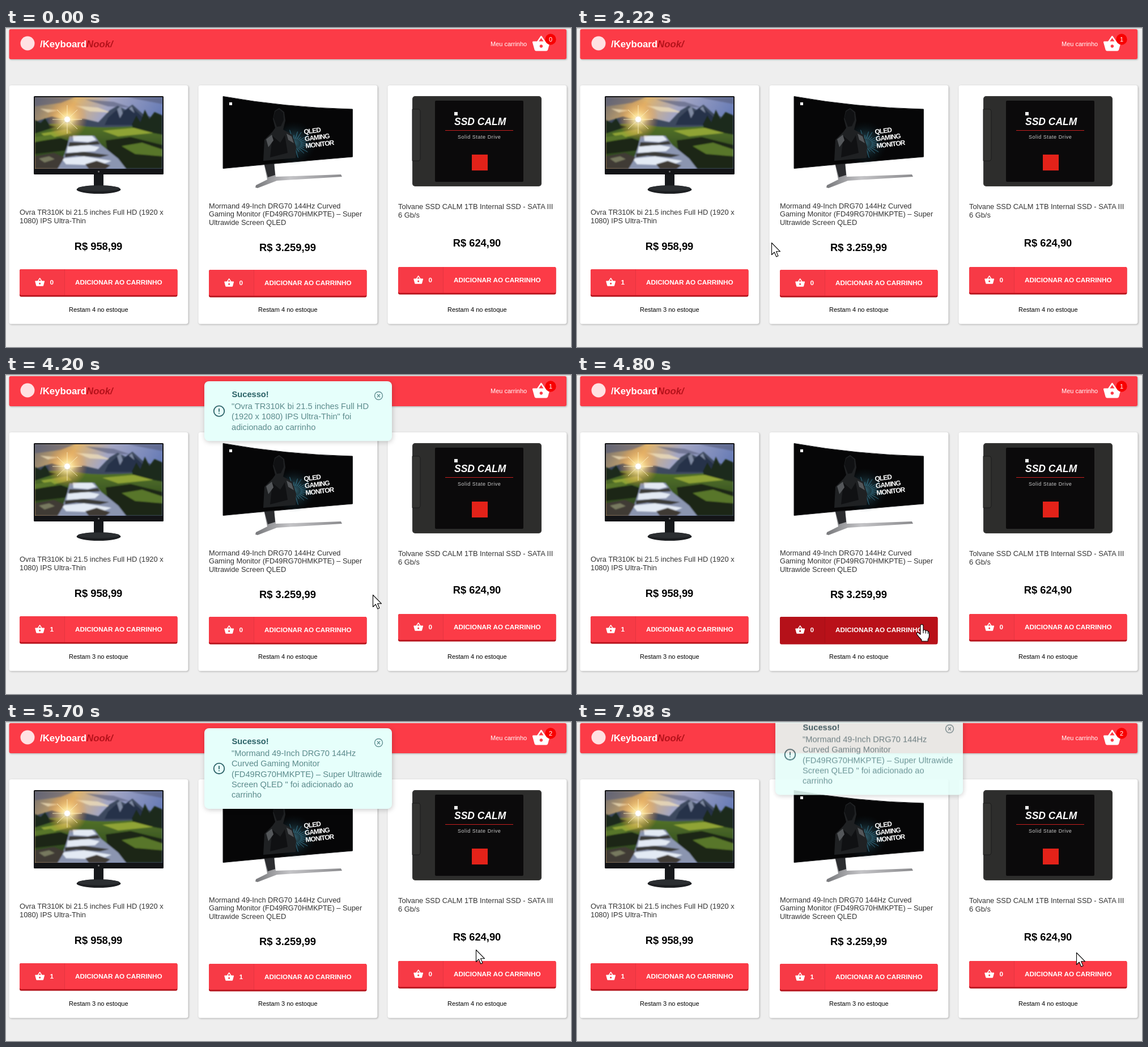
Animation, 997 px wide and 562 px high, one loop 8 s. Source, as an HTML page:

```html
<!DOCTYPE html>
<html lang="pt-BR">
<head>
<meta charset="utf-8">
<title>Loja</title>
<style>
  html, body { margin: 0; width: 100%; height: 100%; overflow: hidden; background: #eee; }
  svg { display: block; width: 997px; height: 562px; font-family: "Liberation Sans", Arial, sans-serif; }

  .brand { font-size: 16.8px; font-weight: bold; fill: #fff; }
  .brand tspan { fill: #b5121b; font-style: italic; }
  .small { font-size: 11px; }
  .name { font-size: 12.84px; fill: #333; }
  .price { font-size: 18.34px; font-weight: bold; }
  .label { font-size: 11.75px; font-weight: bold; fill: #fff; }
  .mid { text-anchor: middle; }
  .face { fill: #fc3b47; }
  .title { font-size: 14.67px; font-weight: bold; fill: #2a6166; }
  .desc { font-size: 14.67px; fill: #5c8a8c; }
  .card { fill: #fff; filter: drop-shadow(1px 1px 1.5px rgba(0,0,0,.28)); }
  .toast rect { fill: #e6fffb; filter: drop-shadow(1px 2px 4px rgba(0,0,0,.2)); }
  .icon { fill: none; stroke: #2a6166; stroke-linecap: round; }

  .show1, .show2, .hide1, .hide2, .hover1, .hover2, .toast, .cursor, .arrow, .hand {
    animation: 8s step-end infinite;
  }
  .show1 { animation-name: show1; }
  .show2 { animation-name: show2; }
  .hide1 { animation-name: hide1; }
  .hide2 { animation-name: hide2; }
  .hover1 { animation-name: hover1; }
  .hover2 { animation-name: hover2; }
  .toast1 { animation-name: toast1; }
  .toast2 { animation-name: toast2; }
  .cursor { animation-name: move; }
  .arrow { animation-name: arrow; }
  .hand { animation-name: hand; }

  @keyframes show1 { 0% { opacity: 0 } 27.75%, 100% { opacity: 1 } }
  @keyframes hide1 { 0% { opacity: 1 } 27.75%, 100% { opacity: 0 } }
  @keyframes show2 { 0% { opacity: 0 } 68.25%, 100% { opacity: 1 } }
  @keyframes hide2 { 0% { opacity: 1 } 68.25%, 100% { opacity: 0 } }
  @keyframes hover1 { 0%, 14.25%, 100% { fill: #fc3b47 } 9% { fill: #b91119 } }
  @keyframes hover2 { 0%, 62.25%, 100% { fill: #fc3b47 } 58.5% { fill: #b91119 } }
  @keyframes hand { 0%, 14.25%, 62.25%, 100% { opacity: 0 } 9%, 58.5% { opacity: 1 } }
  @keyframes arrow { 0%, 14.25%, 62.25%, 100% { opacity: 1 } 9%, 58.5% { opacity: 0 } }

  @keyframes toast1 {
    0%     { opacity: 0; transform: translateY(-120px) }
    29.25% { opacity: .6; transform: translateY(-40px) }
    30%    { opacity: .9; transform: translateY(-10px) }
    30.75% { opacity: 1; transform: none }
    56.25% { opacity: .97; transform: translateY(-8px) }
    57%    { opacity: .88; transform: translateY(-24.5px) }
    57.75% { opacity: .68; transform: translateY(-48px) }
    58.5%  { opacity: .42; transform: translateY(-74px) }
    59.25% { opacity: .18; transform: translateY(-98px) }
    60%, 100% { opacity: 0; transform: translateY(-120px) }
  }
  @keyframes toast2 {
    0%     { opacity: 0; transform: translateY(-160px) }
    69.75% { opacity: .6; transform: translateY(-40px) }
    70.5%  { opacity: .9; transform: translateY(-10px) }
    71.25% { opacity: 1; transform: none }
    99%    { opacity: .97; transform: translateY(-8px) }
    99.75%, 100% { opacity: .88; transform: translateY(-24.5px) }
  }
  @keyframes move {
    0%     { transform: translate(-50px, -50px) }
    3.75%  { transform: translate(833px, 57px) }
    4.5%   { transform: translate(772px, 62px) }
    5.25%  { transform: translate(690px, 76px) }
    6%     { transform: translate(592px, 98px) }
    6.75%  { transform: translate(458px, 172px) }
    7.5%   { transform: translate(340px, 255px) }
    8.25%  { transform: translate(264px, 320px) }
    9%     { transform: translate(228px, 428px) }
    9.75%  { transform: translate(203px, 448px) }
    11.25% { transform: translate(205px, 449px) }
    13.5%  { transform: translate(210px, 447px) }
    14.25% { transform: translate(227px, 394px) }
    15%    { transform: translate(268px, 396px) }
    15.75% { transform: translate(343px, 378px) }
    44.25% { transform: translate(347px, 380px) }
    45%    { transform: translate(358px, 381px) }
    45.75% { transform: translate(375px, 381px) }
    46.5%  { transform: translate(407px, 379px) }
    47.25% { transform: translate(444px, 376px) }
    48%    { transform: translate(487px, 374px) }
    48.75% { transform: translate(532px, 372px) }
    49.5%  { transform: translate(573px, 372px) }
    50.25% { transform: translate(604px, 375px) }
    51%    { transform: translate(627px, 380px) }
    51.75% { transform: translate(640px, 385px) }
    52.5%  { transform: translate(647px, 387px) }
    56.25% { transform: translate(643px, 391px) }
    57%    { transform: translate(632px, 396px) }
    57.75% { transform: translate(615px, 400px) }
    58.5%  { transform: translate(610px, 432px) }
    59.25% { transform: translate(608px, 440px) }
    61.5%  { transform: translate(616px, 437px) }
    62.25% { transform: translate(642px, 401px) }
    63%    { transform: translate(667px, 418px) }
    66%    { transform: translate(674px, 416px) }
    66.75% { transform: translate(696px, 411px) }
    67.5%  { transform: translate(723px, 405px) }
    68.25% { transform: translate(750px, 404px) }
    69%    { transform: translate(774px, 403px) }
    69.75% { transform: translate(798px, 401px) }
    70.5%  { transform: translate(818px, 400px) }
    71.25% { transform: translate(829px, 401px) }
    88.5%  { transform: translate(822px, 400px) }
    89.25% { transform: translate(817px, 399px) }
    90%    { transform: translate(826px, 401px) }
    90.75% { transform: translate(845px, 404px) }
    91.5%  { transform: translate(866px, 406px) }
    92.25%, 100% { transform: translate(881px, 406px) }
  }
</style>
</head>
<body>
<svg viewBox="0 0 997 562">
  <defs>
    <path id="basket" d="M17.21 9l-4.38-6.56c-.19-.28-.51-.42-.83-.42-.32 0-.64.14-.83.43L6.79 9H2c-.55 0-1 .45-1 1 0 .09.01.18.04.27l2.54 9.27c.23.84 1 1.46 1.92 1.46h13c.92 0 1.69-.62 1.93-1.46l2.54-9.27L23 10c0-.55-.45-1-1-1h-4.79zM9 9l3-4.4L15 9H9zm3 8c-1.1 0-2-.9-2-2s.9-2 2-2 2 .9 2 2-.9 2-2 2z"/>
    <linearGradient id="sky" x2="1" y2=".35">
      <stop offset="0" stop-color="#74706f"/><stop offset=".3" stop-color="#dfb36c"/>
      <stop offset=".55" stop-color="#a3a6c4"/><stop offset="1" stop-color="#6076b4"/>
    </linearGradient>
    <radialGradient id="sun">
      <stop offset="0" stop-color="#fff"/><stop offset=".25" stop-color="#ffe79a"/>
      <stop offset="1" stop-color="#e8842c" stop-opacity="0"/>
    </radialGradient>
    <linearGradient id="grass" x2="0" y2="1">
      <stop offset="0" stop-color="#55752a"/><stop offset="1" stop-color="#22381b"/>
    </linearGradient>
    <linearGradient id="steel" x2="1">
      <stop offset="0" stop-color="#77787b"/><stop offset=".4" stop-color="#c4c4c7"/><stop offset="1" stop-color="#8a8a8d"/>
    </linearGradient>
    <radialGradient id="glow">
      <stop offset="0" stop-color="#4f9db5"/><stop offset="1" stop-color="#0a2530" stop-opacity="0"/>
    </radialGradient>
    <filter id="soft"><feGaussianBlur stdDeviation=".8"/></filter>
    <clipPath id="screen"><path d="M51 122h225v126H51z"/></clipPath>
  </defs>

  <path fill="#eee" d="M0 0h997v562H0z"/>

  <rect class="card" style="fill:#fc3b47" x="5.500" y="2" width="983.500" height="53" rx="3"/>
  <circle cx="38" cy="27" r="12.500" fill="#ffe1e3"/>
  <text class="brand" x="60" y="34">/Keyboard<tspan>Nook/</tspan></text>
  <text class="small" x="855" y="32" fill="#fff">Meu carrinho</text>
  <use href="#basket" fill="#fff" transform="translate(927.600 11) scale(1.400)"/>
  <circle cx="961" cy="20" r="9.700" fill="#f80000"/>
  <g class="small mid" fill="#fff">
    <text class="hide1" x="961" y="24">0</text>
    <g class="show1"><text class="hide2" x="961" y="24">1</text></g>
    <text class="show2" x="961" y="24">2</text>
  </g>

  <g id="cards"></g>

  <!-- flat monitor -->
  <g>
    <path fill="#17191c" d="M155 256h17v26h-17z"/>
    <ellipse cx="163.500" cy="284.500" rx="39" ry="7.500" fill="#1d1f22"/>
    <ellipse cx="163.500" cy="282.500" rx="37" ry="5" fill="#2b2e31"/>
    <rect x="49" y="120" width="229" height="138" rx="1.500" fill="#131417"/>
    <circle cx="163.500" cy="253" r="1.500" fill="#777"/>
    <g clip-path="url(#screen)">
      <path fill="url(#sky)" d="M51 122h225v126H51z"/>
      <g filter="url(#soft)">
        <path fill="#565c78" opacity=".6" d="M51 122h70l-24 10-46 6zM140 126l50 4 30 10-40-2zM215 122h61v12z"/>
        <path fill="#f4e3bd" opacity=".7" d="M122 137l40 3 24 9-38-2zM60 142l34 3-20 4z"/>
        <path fill="#3d4a5e" d="M51 165l30-9 34 8 22-4 26 6 20-21 14-8 14 7 12-9 18 16 35 14v30H51z"/>
        <path fill="#263148" d="M180 158l20-18 6 8 14-10 18 16 14 17h-78z"/>
        <path fill="#7f8aa2" d="M196 143l6-5 4 12-5 9zM217 142l5-4 5 12z"/>
        <path fill="url(#grass)" d="M51 172q40-7 80 0t145-3v79H51z"/>
        <path fill="#1a2a1b" d="M51 162l10 5 8-8 8 12 12 3-38 12zM222 170l8-16 7 12 8-22 8 16 9-12 14 6v34l-51-9z"/>
        <path fill="#8fa336" d="M62 186l46-8 8 7-42 10zM170 181l56-5 34 9-62 6z"/>
        <path fill="#1d2817" d="M51 200l46-6 22 8-14 14-54 6zM176 198l44-6 56 14v42h-66l-30-24z"/>
        <path fill="#587629" d="M204 208l36-6 36 12v12l-48-4zM51 192l28-4 10 6-38 7z"/>
        <path fill="#8b95b0" d="M112 191l44-1 12 16 30 24 14 18H84l18-22 6-18z"/>
        <path fill="#e3eaf4" d="M118 190h34l7 7-14 4-26-2zM109 208l26-4 30 6-8 7-50 3zM98 230l40-4 48 8-20 8-60-2z"/>
        <path fill="#3a3a38" d="M112 201l32 1 18-3 4 6-34 2-22 2zM104 221l34-3 44 6-16 4-42-3-20 3z"/>
        <path fill="#403b34" d="M51 226l34-6 18 8-12 20H51zM140 240l20-6 24 8-8 6h-30z"/>
        <path fill="#77795f" d="M58 230l18-4 10 5-18 6z"/>
      </g>
      <circle cx="108" cy="161" r="36" fill="url(#sun)" opacity=".85"/>
      <path stroke="#fff3c4" stroke-width=".800" d="M82 161h52M108 136v50M90 144l36 34M126 144l-36 34"/>
      <circle cx="108" cy="161" r="5" fill="#fff"/>
    </g>
  </g>

  <!-- curved monitor -->
  <g>
    <path fill="url(#steel)" d="M455 238l17-3 4 27 115-4 2 4-115 7-34 13-4-1 1-4 20-10z"/>
    <path fill="#2c2d30" d="M455 237l18-2 2 24-13 4z"/>
    <path fill="#060607" stroke="#1c1d1f" d="M383 120.500Q492 140 611.500 143V227Q492 237 383 247.500z"/>
    <circle cx="508" cy="203" r="39" fill="url(#glow)" opacity=".6"/>
    <g id="rays" stroke="#4aa3c4" stroke-width="1"></g>
    <path fill="#1f2123" d="M454 234l2-37 14-14 5-7-4-16 3-14 8-5 9 7 2 15-4 16 16 9 7 21-1 20z"/>
    <path fill="#101113" d="M472 158l3-11 7-4 7 6 1 13-5 11-7 1zM470 190l14 12 8-13 5 31-31 8z"/>
    <path fill="#54575a" d="M459 196l10-8 3 10-9 12zM495 186l9 5 4 12-10-6z"/>
    <path fill="#fff" d="M394 131h5v5h-5z"/>
    <g fill="#fff" font-size="12" font-weight="bold" letter-spacing="-.900" transform="rotate(-7 526 187)">
      <text x="526" y="187">QLED</text><text x="526" y="199.500">GAMING</text><text x="526" y="212">MONITOR</text>
    </g>
  </g>

  <!-- solid state drive -->
  <g>
    <rect x="717" y="120" width="228" height="159" rx="5" fill="#2d2d2c"/>
    <rect x="718" y="121" width="226" height="157" rx="4.500" fill="none" stroke="#3a3a38"/>
    <path fill="#343432" stroke="#1b1b1b" d="M717 143h12l2 3v85l-2 3h-12z"/>
    <rect x="757" y="128" width="156" height="143" rx="2" fill="#0b0a0b"/>
    <path fill="#eee" d="M791 148h6v6h-6z"/>
    <text x="791" y="171" font-size="17.500" font-weight="bold" font-style="italic" fill="#fff">SSD CALM</text>
    <path stroke="#c8201f" d="M775 180.500h120"/>
    <text x="797" y="195" font-size="9" letter-spacing=".550" fill="#c9c9c9">Solid State Drive</text>
    <path fill="#e32219" d="M822 223h28v28h-28z"/>
  </g>

  <g id="toasts"></g>

  <g class="cursor" stroke="#000" stroke-width="1.100" stroke-linejoin="round" fill="#fff">
    <path class="arrow" d="M.5.5V21.500L5.300 17 8.800 25 12 23.600 8.600 15.800H15.600z"/>
    <g class="hand">
      <path d="M-2 2Q-2-.5.500-.5T3 2V10.500Q3.300 8.800 5 8.800T7.400 11.300Q7.800 9.900 9.400 10T11.400 12.400Q13.400 11.800 13.400 14.400V20Q13.400 23 11.200 25.500V29H0V26.500Q-5 21.500-8.500 16.500-9 14-7 13.800-5 14-2 17.200z"/>
      <path fill="none" d="M3 10v5M7.400 11v4.500M11.400 12.400v3.500"/>
    </g>
  </g>
  <path fill="#c9c9c9" d="M0 0h997v1H0z"/>
</svg>

<script>
  const products = [
    { lines: ['Ovra TR310K bi 21.5 inches Full HD (1920 x', '1080) IPS Ultra-Thin'],
      price: '958,99', nameY: 329, priceY: 391, buttonY: 425, sale: 1 },
    { lines: ['Mormand 49-Inch DRG70 144Hz Curved', 'Gaming Monitor (FD49RG70HMKPTE) – Super', 'Ultrawide Screen QLED'],
      price: '3.259,99', nameY: 317.5, priceY: 393, buttonY: 426, sale: 2 },
    { lines: ['Tolvane SSD CALM 1TB Internal SSD - SATA III', '6 Gb/s'],
      price: '624,90', nameY: 319, priceY: 385, buttonY: 421 }
  ];
  const toasts = [
    ['"Ovra TR310K bi 21.5 inches Full HD', '(1920 x 1080) IPS Ultra-Thin" foi', 'adicionado ao carrinho'],
    ['"Mormand 49-Inch DRG70 144Hz', 'Curved Gaming Monitor', '(FD49RG70HMKPTE) – Super Ultrawide',
     'Screen QLED " foi adicionado ao', 'carrinho']
  ];

  const text = (cls, x, y, s) => `<text class="${cls}" x="${x}" y="${y}">${s}</text>`;
  const stack = (cls, x, y, gap, lines) =>
    lines.map((s, i) => text(cls, x, y + i * gap, s)).join('');

  // A text that swaps to its second value once the product is sold.
  const swap = (sale, cls, x, y, before, after) => sale
    ? text(`${cls} hide${sale}`, x, y, before) + text(`${cls} show${sale}`, x, y, after)
    : text(cls, x, y, before);

  const card = (p, i) => {
    const y = p.buttonY;
    return `<g transform="translate(${i * 334})">
      <rect class="card" x="5.500" y="101" width="316" height="420.500" rx="4"/>
      ${stack('name', 24, p.nameY, 14.7, p.lines)}
      ${text('price mid', 163, p.priceY, 'R$ ' + p.price)}
      <rect x="24" y="${y}" width="278.500" height="48.500" rx="3" fill="#b5121b"/>
      <rect class="face ${p.sale ? 'hover' + p.sale : ''}" x="24" y="${y}" width="278.500" height="45.800" rx="3"/>
      <path d="M24 ${y}h79.500v45.800H24z" opacity=".02"/>
      <path d="M103.500 ${y}v45.800" stroke="#000" opacity=".08"/>
      <use href="#basket" fill="#fff" transform="translate(50.500 ${y + 13.7}) scale(.764)"/>
      ${swap(p.sale, 'label', 77.5, y + 27, '0', '1')}
      ${text('label', 122, y + 27, 'ADICIONAR AO CARRINHO')}
      ${swap(p.sale, 'small mid', 163.3, 500, 'Restam 4 no estoque', 'Restam 3 no estoque')}
    </g>`;
  };

  const toast = (lines, i) => {
    const h = 50.2 + lines.length * 18.34, mid = 11 + h / 2;
    return `<g class="toast toast${i + 1}">
      <rect x="350" y="11" width="331" height="${h}" rx="8"/>
      <g class="icon" stroke-width="1.800">
        <circle cx="376" cy="${mid}" r="9.300"/>
        <path d="M376 ${mid - 4}v4.500m0 3.300v.1"/>
      </g>
      <g class="icon" stroke-width="1.400" opacity=".7">
        <circle cx="657.500" cy="36.500" r="7"/>
        <path d="M655.300 34.300l4.400 4.400m0-4.400l-4.400 4.400"/>
      </g>
      ${text('title', 398.500, 38.5, 'Sucesso!')}
      ${stack('desc', 398, 60, 18.34, lines)}
    </g>`;
  };

  const ray = (_, i) => {
    const a = i * Math.PI / 14, far = 27 + 7 * Math.sin(i * 2.3);
    const at = r => `${508 + r * Math.cos(a)} ${204 + r * Math.sin(a) * .75}`;
    return `<path d="M${at(12)}L${at(far)}" opacity=".6"/>`;
  };

  const fill = (id, html) => document.getElementById(id).innerHTML = html;
  fill('cards', products.map(card).join(''));
  fill('toasts', toasts.map(toast).join(''));
  fill('rays', Array.from({ length: 28 }, ray).join(''));
</script>
</body>
</html>
```
